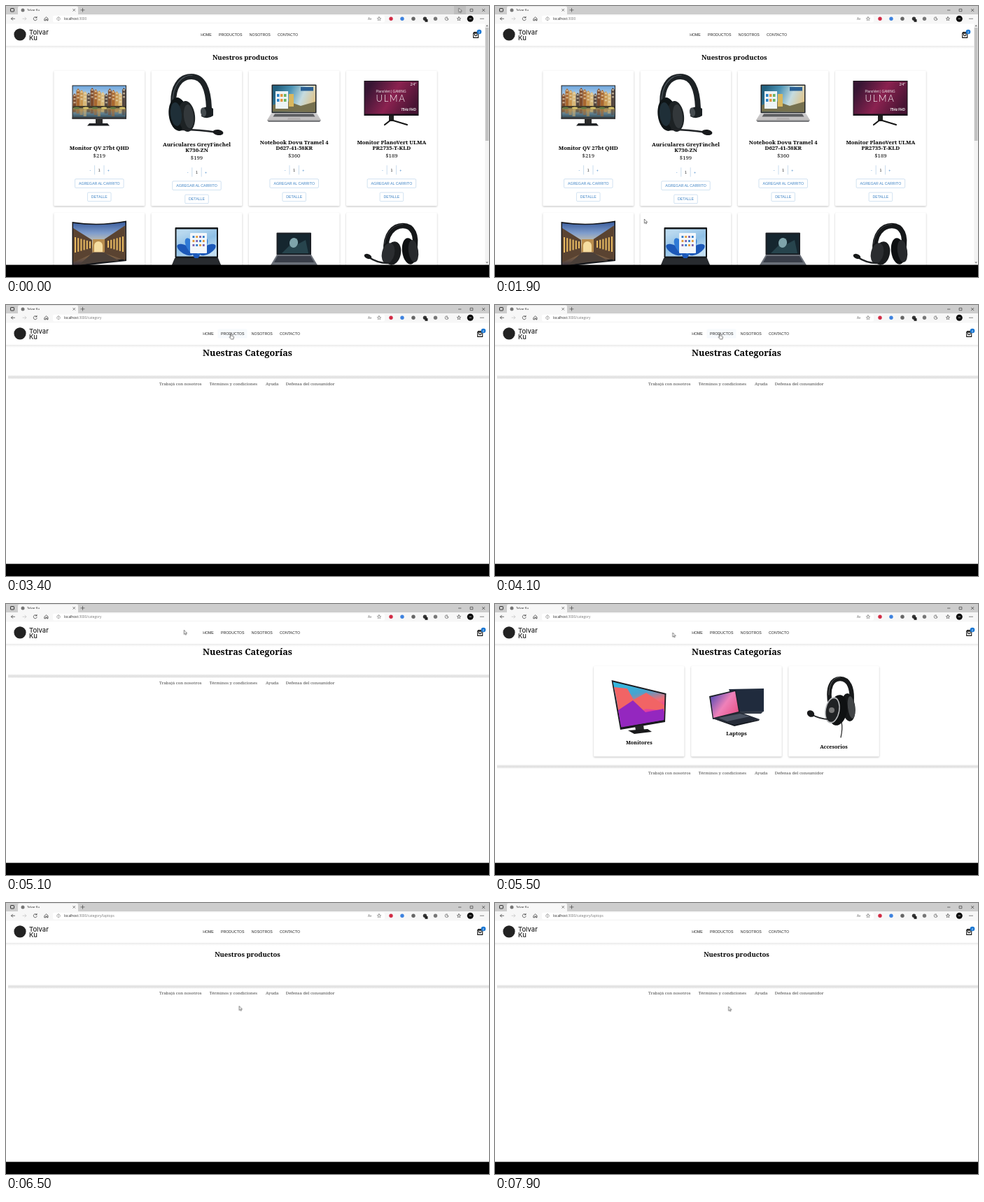
An HTML page for the animation above (8 s loop, 690 by 388 pixels).

```html
<!DOCTYPE html>
<html lang="es">
<head>
<meta charset="utf-8">
<title>Tienda</title>
<style>
html, body { margin: 0; width: 100%; height: 100%; overflow: hidden; background: #fff; }
svg { display: block; width: 690px; height: 388px; }
text { font-family: "Liberation Sans", Arial, sans-serif; font-size: 5.25px; fill: #222; }
.mid { text-anchor: middle; }
.ui { font-family: "Open Sans", sans-serif; font-size: 4.8px; }
.serif { font-family: "Noto Serif", serif; font-size: 7.8px; fill: #111; }
.bold { font-weight: 700; fill: #000; }
.foot { font-size: 6.05px; fill: #444; }
.brand { font: 500 9.4px Inter, sans-serif; }
.line { fill: none; stroke: #333; stroke-width: .75; stroke-linecap: round; stroke-linejoin: round; }
.card { fill: #fff; filter: drop-shadow(0 1px 1px rgba(0,0,0,.25)); }
.blue { fill: #3a80c4; }
.button { fill: #fff; stroke: #b3cee8; stroke-width: .6; }
.nav { animation: nav 8s step-end infinite; }
.cart { animation: cart 8s step-end infinite; }
#cursor { animation: cursor 8s linear infinite; }
@keyframes nav { 0% { transform: translateX(-3px); } 42.5%, 100% { transform: none; } }
@keyframes cart { 0% { transform: translateX(-6px); } 42.5%, 100% { transform: none; } }
@keyframes cursor {
  0%, 17.5% { transform: translate(646.5px, 2.8px); animation-timing-function: step-end; }
  23.75% { transform: translate(213px, 305px); animation-timing-function: steps(6); }
  31.25%, 35% { transform: translate(326px, 52.5px); animation-timing-function: steps(4, jump-start); }
  40%, 57.5% { transform: translate(320px, 40.5px); animation-timing-function: steps(5, jump-start); }
  62.5% { transform: translate(254px, 37.3px); }
  63.75% { transform: translate(254px, 37.3px); animation-timing-function: step-end; }
  68.75%, 75% { transform: translate(253.5px, 41px); animation-timing-function: steps(4, jump-start); }
  78.75%, 81.25% { transform: translate(332.7px, 147.5px); animation-timing-function: step-end; }
  92.5%, 100% { transform: translate(333.3px, 148.2px); }
}
</style>
</head>
<body>
<svg id="stage" viewBox="0 0 690 388"></svg>
<script>
const LOOP = 8000;
const style = document.head.appendChild(document.createElement('style'));

// Shows every element of a class only between two times.
function show(name, from, to) {
  const at = (ms, state) => `${ms / LOOP * 100}% { visibility: ${state}; }`;
  style.textContent += `@keyframes ${name} {
    ${from ? at(0, 'hidden') : ''} ${at(from, 'visible')}
    ${to < LOOP ? at(to, 'hidden') + at(LOOP, 'hidden') : at(LOOP, 'visible')} }
    .${name} { animation: ${name} ${LOOP}ms step-end infinite; }`;
}
show('home', 0, 3400);
show('category', 3400, 6500);
show('waiting', 3400, 5500);
show('groups', 5500, 6500);
show('laptops', 6500, LOOP);
show('minimize', 0, 1400);
show('over', 3000, 4700);
show('handNav', 3000, 4700);
show('handCard', 6200, 6500);
show('arrowTop', 0, 1400);
show('arrowIn', 1900, 3000);
show('arrowOut', 4700, 6200);
show('arrowEnd', 6500, LOOP);

const rect = (x, y, w, h, fill, extra = '') =>
  `<rect x="${x}" y="${y}" width="${w}" height="${h}" fill="${fill}" ${extra}/>`;
const dot = (x, y, r, fill) => `<circle cx="${x}" cy="${y}" r="${r}" fill="${fill}"/>`;
const oval = (x, y, rx, ry, fill, turn = 0) =>
  `<ellipse cx="${x}" cy="${y}" rx="${rx}" ry="${ry}" fill="${fill}" transform="rotate(${turn} ${x} ${y})"/>`;
const shape = (d, fill) => `<path d="${d}" fill="${fill}"/>`;
const stroke = (d, color = '#333', width = .75) =>
  `<path class="line" d="${d}" style="stroke:${color};stroke-width:${width}"/>`;
const text = (x, y, words, cls = '', css = '') =>
  `<text x="${x}" y="${y}" class="${cls}" style="${css}">${words}</text>`;
const group = (cls, ...parts) => `<g class="${cls}">${parts.join('')}</g>`;
const repeat = (count, draw) => Array.from({ length: count }, (_, i) => draw(i)).join('');
const gradient = (id, stops, angle = 90) =>
  `<linearGradient id="${id}" gradientTransform="rotate(${angle} .5 .5)">${stops.map((c, i) =>
    `<stop offset="${i / (stops.length - 1)}" stop-color="${c}"/>`).join('')}</linearGradient>`;

const defs = `<defs>
  ${gradient('day', ['#6fa6dc', '#b9d6ee', '#e2e6e2'])}
  ${gradient('water', ['#6e7350', '#a08a58', '#5f7f90', '#39525e'])}
  ${gradient('evening', ['#3a5c9c', '#7f9dcc', '#d8c9a4', '#8a6a45', '#3b3440'])}
  ${gradient('wine', ['#381634', '#8b2250', '#471433'], 20)}
  ${gradient('vivid', ['#35b5dc', '#47a3cf', '#f56a72', '#d92bb4', '#6431b4'], 75)}
  ${gradient('pink', ['#6f55b5', '#ef81b9', '#e8598f'], 35)}
  ${gradient('sky', ['#23617f', '#4b93b4', '#c5dbe0', '#e0c489'], 15)}
  ${gradient('metal', ['#d0d0d2', '#c0bdbd'])}
  ${gradient('bloom', ['#b9d9ef', '#8fc0e6', '#c3dff2'], 60)}
  ${gradient('shade', ['#e9e9e9', '#fff'])}
  ${gradient('rule', ['#f5f5f5', '#dedede', '#f5f5f5'])}
</defs>`;

function browser() {
  const icons = [[550, '#d22b45'], [566, '#3d82df'], [582, '#666'], [598.5, '#333'], [613.5, '#777']];
  return rect(0, 0, 690, 12.5, '#cdcdcd') +
    rect(0, 12, 690, 13.5, '#f7f7f7') +
    rect(17, .5, 86, 13, '#f7f7f7', 'rx="2"') +
    group('minimize', rect(640, 0, 17, 12, '#bebebe')) +
    rect(6.5, 3.5, 5, 4.5, 'none', 'stroke="#222" stroke-width=".9" rx=".7"') +
    dot(24, 6, 2.5, '#777') + text(30, 7.4, 'Tolvar Ku', 'ui', 'font-size:4.2px') +
    stroke('M95.7 4.3l3 3m0-3l-3 3M107 5.8h5m-2.5-2.5v5', '#333', .6) +
    stroke('M646.5 6h3.5M663.5 4.3h3.4v3.4h-3.4zM680.5 4.3l3.4 3.4m0-3.4l-3.4 3.4', '#222', .6) +
    rect(67, 13.7, 474, 9.7, '#fff', 'rx="2"') +
    stroke('M12.5 18.2h-5l2-2m-2 2l2 2') +
    stroke('M24 18.2h5l-2-2m2 2l-2 2', '#c2c2c2') +
    stroke('M43.8 16.7a2.5 2.5 0 1 0 .4 2.3M44 15.3v1.6h-1.6') +
    stroke('M55.2 18l2.4-2.2 2.4 2.2v2.8h-1.5v-1.8h-1.7v1.8h-1.6z') +
    stroke('M75 15.8a2.4 2.4 0 1 0 .01 0M75 17.8v1.6M75 17v.1', '#666', .5) +
    text(83, 20, 'localhost<tspan fill="#777">:3000</tspan>', 'ui') +
    group('category', text(115.3, 20, '/category', 'ui', 'fill:#777')) +
    group('laptops', text(115.3, 20, '/category/laptops', 'ui', 'fill:#777')) +
    text(517, 20, 'A»', 'ui', 'fill:#555') +
    stroke('M533 15.6l.8 1.7 1.8.2-1.3 1.3.3 1.8-1.6-.9-1.6.9.3-1.8-1.3-1.3 1.8-.2z', '#444', .5) +
    icons.map(([x, color]) => dot(x, 18.2, 2.7, color)).join('') +
    rect(598.5, 19, 4, 3.8, '#222') +
    stroke('M630 15.8a2.4 2.4 0 1 0 2 2.4h-1.8z', '#444', .6) +
    stroke('M647 15.6l.8 1.7 1.8.2-1.3 1.3.3 1.8-1.6-.9-1.6.9.3-1.8-1.3-1.3 1.8-.2z', '#333', .6) +
    dot(663.3, 18.2, 4.5, '#0b0b0b') + rect(661.6, 17.7, 3.4, .9, '#bbb') +
    [678, 680, 682].map(x => dot(x, 18.2, .6, '#333')).join('');
}

function header() {
  const links = [[289, 'HOME'], [323.7, 'PRODUCTOS'], [365.8, 'NOSOTROS'], [405.5, 'CONTACTO']];
  return rect(0, 25, 690, 32.5, '#fff') + rect(0, 57, 690, 4, 'url(#shade)') +
    dot(20, 40.8, 8.6, '#222') + text(33, 40.5, 'Tolvar', 'brand') + text(33, 49.3, 'Ku', 'brand') +
    group('nav',
      group('over', rect(302.5, 34.5, 42, 13, '#f7fafd', 'rx="1.5"')),
      ...links.map(([x, word]) => text(x, 43.1, word, 'mid'))) +
    group('cart',
      stroke('M673.7 39.1h7v6.3h-7zM675.5 40.5c0 3 3.4 3 3.4 0M673.7 39.1l1-1.5h5l1 1.5', '#111', 1.1),
      dot(682, 37, 3.3, '#1976d2'), text(682, 38.6, '2', 'mid', 'fill:#fff;font-size:4.3px'));
}

const brick = i => ['#7d4a2c', '#c9974f', '#54463f', '#a8672f', '#d8b878'][i * 3 % 5];
const monitorCity = rect(94.5, 113.5, 77.5, 48, '#222') + rect(95.5, 114.5, 75.5, 30, 'url(#day)') +
  rect(95.5, 143, 75.5, 16.5, 'url(#water)') +
  repeat(15, i => {
    const x = 95.5 + i * 5.03, h = 16 + i * 7 % 9;
    return shape(`M${x} 144v-${h}l2.5-3 2.5 3v${h}z`, brick(i)) +
      repeat(3, n => rect(x + 1, 143 - h + n * 5, 3, 2.4, '#f0e2c0', 'opacity=".6"')) +
      rect(x, 148, 4.2, 4 + i % 4 * 2, brick(i), 'opacity=".55"');
  }) + rect(95.5, 143, 75.5, 3, '#433c2c') +
  repeat(6, i => oval(101 + i * 13, 146, 4, 1.5, i % 2 ? '#d9c46c' : '#647b42')) +
  rect(94.5, 159.5, 77.5, 2.4, '#3a3b3d') +
  shape('M128 162h10v6h-10z', '#2b2b2b') + shape('M119 168h26l3 3.5h-32z', '#202225');

const headsetLeft = stroke('M240 147C236 116 249 101 265 101C281 101 289 118 290 146', '#1d2225', 8) +
  stroke('M238 138C238 114 250 99 266 99', '#515a60', 1.2) +
  shape('M281 146q9-4 15 1v10q-8 6-17 1z', '#1b2023') + oval(282, 152, 4, 6.5, '#454b4f', -10) +
  oval(246, 155, 13.5, 24, '#0f1517', -6) + oval(258, 158, 12, 22, '#1d2224', -6) +
  oval(261, 158, 7, 17, '#33383b', -6) + oval(243, 155, 8, 17, '#1f2f38', -6) +
  stroke('M252 177Q274 177 302 181', '#202326', 2.6) + oval(303, 181, 7.5, 4, '#181a1c', 8);

const silverLaptop = rect(379.5, 112.5, 64, 41, '#202326', 'rx="1"') +
  rect(381, 114, 61, 37.5, 'url(#sky)') + shape('M381 142l18-7 22 8 21-6v14.5h-61z', '#77714f') +
  rect(385, 122, 18, 25, '#edf4f7') + rect(404, 126, 7, 18, '#d9b75e') +
  repeat(6, i => rect(387 + i % 3 * 5, 126 + Math.floor(i / 3) * 7, 3.5, 4, ['#2b84c9', '#e39640', '#67b45f'][i % 3])) +
  rect(421, 116, 18, 5.5, '#2a6094') +
  shape('M379 153.5h65l6 10H373z', 'url(#metal)') + shape('M384 154.5h55l2.5 4h-60z', '#5c5d60') +
  shape('M403 160h17l1 3h-19z', '#b3b0b0') + shape('M373 163.5h77l-2 2.5h-73z', '#77787b');

const wineMonitor = rect(511.5, 107, 78, 50, '#171319') + rect(512.5, 108, 76, 46.5, 'url(#wine)') +
  text(550, 124, 'PlanoVert | GAMING', 'mid', 'fill:#eee;font-size:4.7px') +
  text(550, 136.5, 'ULMA', 'mid', 'fill:#fff;font-size:13px;letter-spacing:1.6px;font-family:Lato,sans-serif;font-weight:300') +
  text(582, 114, '24"', 'mid', 'fill:#fff;font-size:6px') +
  text(575, 150, '75Hz FHD', 'mid', 'fill:#eee;font-size:4.6px;font-weight:700') +
  rect(547, 157, 7, 8, '#222') + stroke('M550 163L541 170M550 163L573 170', '#161616', 2.2);

const curvedMonitor = shape('M94.5 309Q133 315 172 307.5V365Q133 369 94.5 374z', '#15171b') +
  shape('M96 311Q133 316 170.5 309.5V362Q133 366 96 372z', 'url(#evening)') +
  shape('M96 318l27 17v20l-27 12zM170.5 314l-30 20v20l30 10z', '#5a4331') +
  repeat(6, i => {
    const h = 22 - i * 2.4;
    return rect(98 + i * 4.2, 342 - h / 2, 2, h, '#e9bb62') + rect(166 - i * 4.2, 341 - h / 2, 2, h, '#e9bb62');
  }) + rect(124, 334, 17, 18, '#b98d4d') + shape('M126 352v-9a6 6 0 0 1 12 0v9z', '#f6dda0') +
  shape('M124 353h16l22 12q-30 1-58 6z', '#4b4039');

const blackLaptop = rect(241.5, 317, 61.5, 44, '#15181b', 'rx="1"') +
  rect(243.5, 319.5, 57.5, 39, 'url(#bloom)') +
  repeat(5, i => oval(256 + i * 8, 349 - i % 2 * 5, 6, 13, i % 2 ? '#2f7ad6' : '#1c58b8', i * 30 - 60)) +
  rect(263, 325, 24, 29, '#f3f7fb', 'rx="1"') +
  repeat(12, i => rect(266.5 + i % 4 * 4.8, 329 + Math.floor(i / 4) * 6, 2.8, 3, ['#327dc8', '#e39b3c', '#7d62ad'][i % 3])) +
  shape('M241 361h62l5 12h-72z', '#282b2f');

const gamingLaptop = rect(386.5, 324.5, 49.5, 32, '#1b1f25', 'rx="1"') + rect(388.5, 326.5, 45.5, 28, '#15262f') +
  shape('M394 354l14-14 5 3 15-8 4 19z', '#27444d') + oval(411, 339, 6, 7, '#7fa4ab', 15) +
  shape('M387 356h49l9 15h-67z', '#6b7079') + shape('M388 358h47l5 9h-57z', '#383d48');

const headsetRight = stroke('M543 352C541 326 554 314.5 567 314.5C581 314.5 588 328 583 350', '#151719', 7.5) +
  stroke('M541 340C543 322 555 312.5 567 312.5', '#45484b', .9) +
  oval(553, 354, 11, 17, '#1a1c1e', 13) + oval(546, 354, 9, 15, '#2b2d30', 13) +
  oval(576, 351, 10, 19, '#0e1012', -8) + oval(582, 351, 7, 16, '#27292c', -8) +
  stroke('M547 368Q532 369 517 359', '#202224', 2.4) + oval(517, 358.5, 5.5, 3.3, '#17191a', 22);

const tiltedMonitor = shape('M166.5 109L244.5 128L243 169L179 180z', '#19191e') +
  shape('M168.5 111.5L242.5 129.5L241.5 166L180.5 176.5z', 'url(#vivid)') +
  shape('M170 119l19 2 9 16 18-10 26 18v8l-27-3-17 11-21-8z', '#f16465') +
  shape('M176 152l21-14 18 17 26-5v16l-61 10z', '#9427bf') +
  shape('M200 175l12-2 1 8h-12z', '#272729') + shape('M190 181l28-2 6 4-25 3z', '#19191b');

const twoLaptops = shape('M334 122l50-1v33l-36 3z', '#202b3d') + shape('M334 154l50-1-4 4h-46z', '#333b48') +
  shape('M306 132l38-9 6 33-39 9z', '#1c2029') + shape('M308 133.5l35-8.5 5 29-36 9z', 'url(#pink)') +
  shape('M311 164l39-9 28 10-36 9z', '#252b37') + shape('M319 163l31-6 14 4-32 7z', '#4b5362') +
  shape('M311 164l31 9 36-8-1 2-35 8z', '#14181f');

const headsetCategory = stroke('M479 144C474 118 482 107 493 107C505 107 512 120 509 145', '#17191a', 6.5) +
  stroke('M477 130C477 113 484 105 493 105', '#5c5f61', 1) +
  oval(505, 148, 9.5, 20, '#161819', -7) + oval(509, 148, 5, 16, '#424547', -7) +
  oval(490, 152, 13, 22, '#0f1112', 10) + oval(482, 152, 10.5, 19, '#b8babc', 10) +
  oval(482, 152, 9, 17, '#202224', 10) + dot(481, 152, 4, '#777') +
  stroke('M478 165Q464 165 452 158', '#222426', 2) + oval(451, 157, 5.5, 4.5, '#18191b', 35) +
  stroke('M495 169Q497 178 494 191', '#222', 1.2);

const products = [
  { lines: ['Monitor QV 27bt QHD'], price: 219, top: 203, art: monitorCity },
  { lines: ['Auriculares GreyFinchel', 'K730-ZN'], price: 199, top: 198, drop: 3.1, art: headsetLeft },
  { lines: ['Notebook Dovu Tramel 4', 'D627-41-58KR'], price: 360, top: 195, art: silverLaptop },
  { lines: ['Monitor PlanoVert ULMA', 'PR2735-T-KLD'], price: 189, top: 195, art: wineMonitor },
];
const nextRow = [curvedMonitor, blackLaptop, gamingLaptop, headsetRight];

function button(x, y, width, label) {
  return `<rect class="button" x="${x - width / 2}" y="${y - 6.3}" width="${width}" height="12.6" rx="1.3"/>` +
    text(x, y + 1.9, label, 'mid blue');
}

function product({ lines, price, top, art, drop = 0 }, i) {
  const left = 68.4 + i * 139.2, x = left + 64.9;
  return rect(left, 92.5, 129.8, 193.7, '#fff', 'class="card" rx="1.5"') + art +
    lines.map((words, n) => text(x, top + 2.5 + n * 8, words, 'mid serif bold')).join('') +
    text(x, 216.8 + drop, '$' + price, 'mid serif') +
    stroke(`M${x - 6.7} ${228.5 + drop}v12.5m13.4 0v-12.5`, '#b3cee8', .7) +
    text(x - 13, 236.5 + drop, '-', 'mid blue') + text(x, 236.5 + drop, '1', 'mid') +
    text(x + 13, 236.5 + drop, '+', 'mid blue') +
    button(x, 254 + drop, 69.5, 'AGREGAR AL CARRITO') + button(x, 273.3 + drop, 33.5, 'DETALLE') +
    rect(left, 296, 129.8, 193.7, '#fff', 'class="card" rx="1.5"') + nextRow[i];
}

function footer(y) {
  const links = [[219, 'Trabajá con nosotros'], [290.8, 'Términos y condiciones'],
    [371, 'Ayuda'], [399.8, 'Defensa del consumidor']];
  return rect(3, y - 2.7, 687, 5.4, 'url(#rule)') +
    links.map(([x, words]) => text(x, y + 11.3, words, 'serif foot')).join('');
}

const scrollbar = rect(684.3, 25.5, 5.7, 346, '#f3f3f3') + rect(684.8, 31, 4.7, 162, '#c3c3c3') +
  shape('M685.4 29.2l1.8-2.2 1.8 2.2zM685.4 366.4l1.8 2.2 1.8-2.2z', '#777');

const categories = [
  [141, 'Monitores', 198.3, tiltedMonitor],
  [280.2, 'Laptops', 185.8, twoLaptops],
  [419.3, 'Accesorios', 204.2, headsetCategory],
].map(([x, name, y, art]) => rect(x, 89, 129.5, 129.4, '#fff', 'class="card" rx="1.5"') + art +
  text(x + 64.8, y + 2.5, name, 'mid serif bold', 'font-size:7.3px')).join('');

const heading = (x, y, words, size) => text(x, y, words, 'mid serif bold', `font-size:${size}px`);

const arrow = '<path d="M.3 0v6.2l1.4-1.3.9 2 1-.4-.9-2h2z" fill="#fff" stroke="#333" stroke-width=".6"/>';
const hand = '<path d="M.5.5q.8-.8 1.4 0v3l2.8.7q1 .4.7 1.5l-.5 2.6H1.5L-.9 5.4q.3-1 1.4 0z" fill="#fff" stroke="#222" stroke-width=".6"/>';

document.getElementById('stage').innerHTML = defs + rect(0, 0, 690, 388, '#fff') +
  group('home', heading(341.8, 76.8, 'Nuestros productos', 9.45), ...products.map(product)) +
  group('category', heading(345, 73, 'Nuestras Categorías', 12.6)) +
  group('waiting', footer(103.3)) +
  group('groups', categories, footer(232.8)) +
  group('laptops', heading(345, 76.8, 'Nuestros productos', 9.45), footer(119.8)) +
  header() + browser() + group('home', scrollbar) + rect(0, 370.6, 690, 17.4, '#000') +
  `<g id="cursor">${['arrowTop', 'arrowIn', 'arrowOut', 'arrowEnd'].map(c => group(c, arrow)).join('')}
    ${['handNav', 'handCard'].map(c => group(c, hand)).join('')}</g>`;
</script>
</body>
</html>
```
